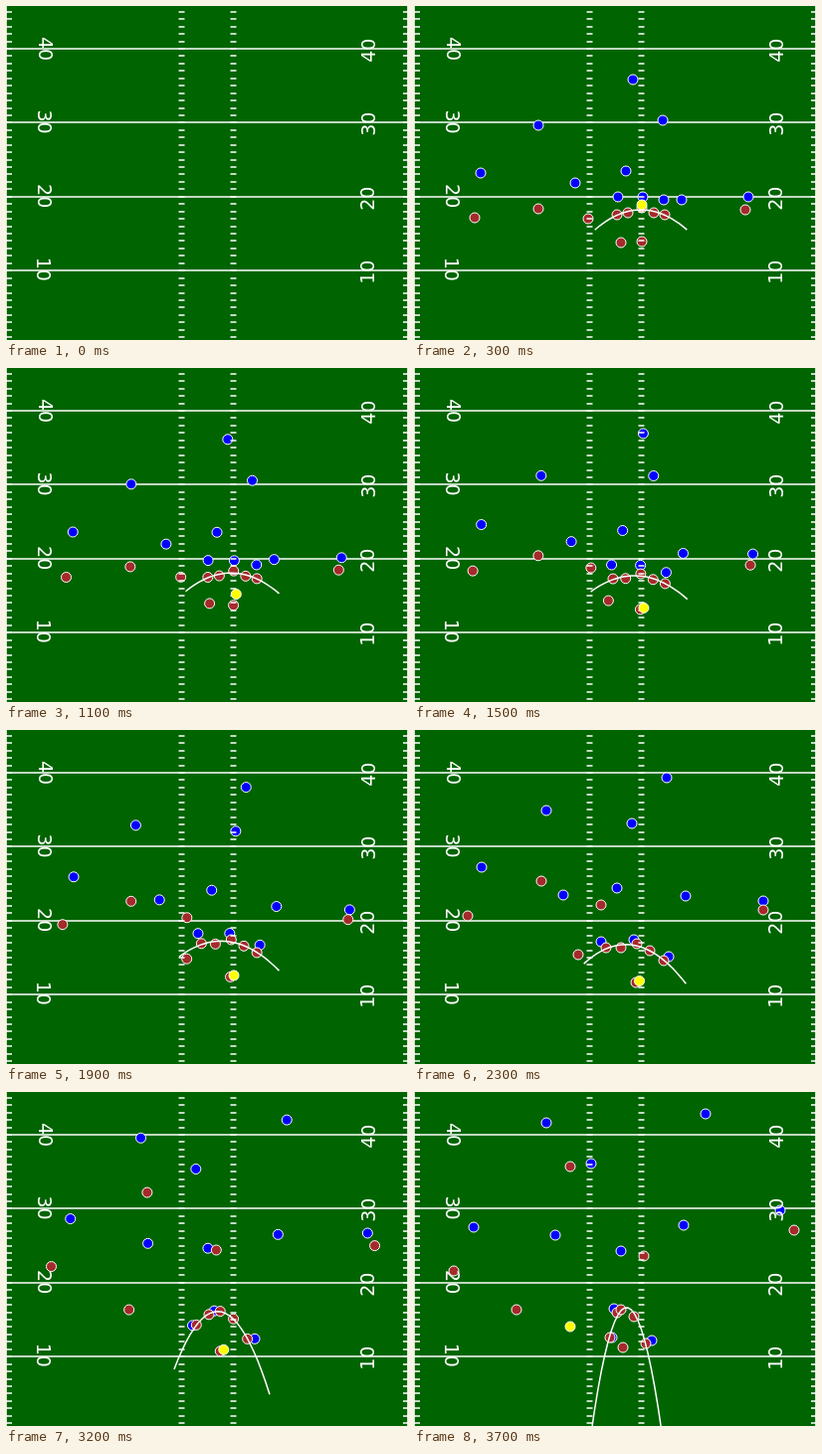
Write an HTML page with a canvas that moves like this. It is 404 px wide and 336 px high and loops after 3800 ms.

```html
<!DOCTYPE html>
<html lang="en">
<head>
<meta charset="utf-8">
<title>Football play</title>
<style>
html, body { margin: 0; width: 404px; height: 336px; overflow: hidden; background: #006400; }
canvas { display: block; }
</style>
</head>
<body>
<canvas id="field" width="404" height="336"></canvas>
<script>
const W = 404, H = 336, LOOP = 3800, STEP = 100;
const SNAP = 700, MID = 2300, THROW = 3300, END = 3700;
const YARD = 7.44, THICK = 1.5;
const g = document.getElementById('field').getContext('2d');

// Each route: x, y at the snap, at MID and at END
const defense = [
  [67, 168, 68, 138, 60, 136],
  [125, 120, 133, 81, 133, 31],
  [220, 74, 254, 48, 293, 22],
  [250, 115, 219, 94, 178, 72],
  [162, 178, 150, 166, 142, 144],
  [213, 166, 204, 159, 208, 160],
  [205, 192, 188, 213, 199, 247],
  [230, 192, 221, 211, 201, 218],
  [251, 195, 256, 228, 239, 250],
  [269, 195, 273, 167, 271, 134],
  [336, 192, 351, 172, 368, 119]
];
const line = [
  [204, 210, 193, 219, 197, 247],
  [215, 208, 208, 219, 204, 222],
  [229, 203, 224, 215, 208, 219],
  [241, 208, 237, 222, 221, 226],
  [252, 210, 251, 232, 233, 253]
];
const backs = [
  [61, 213, 54, 187, 40, 180],
  [125, 204, 128, 152, 157, 75],
  [175, 214, 188, 176, 231, 165],
  [333, 205, 351, 181, 382, 139],
  [208, 238, 165, 226, 103, 219]
];
const passer = [229, 237, 223, 254, 210, 257];

const progress = (t, from, to) => Math.min(1, Math.max(0, (t - from) / (to - from)));
const mix = (p, q, u) => p.map((v, k) => v + (q[k] - v) * u);
const yardLine = yards => Math.round(43 + yards * YARD);

// Cubic a u^2 + b u^3 from rest through the two later points
function place([x0, y0, x1, y1, x2, y2], t) {
  const u = progress(t, SNAP, END), m = progress(MID, SNAP, END);
  const run = (start, mid, end) => {
    const a = ((mid - start) / (m * m) - m * (end - start)) / (1 - m);
    return start + a * u * u + (end - start - a) * u ** 3;
  };
  return [run(x0, x1, x2), run(y0, y1, y2)];
}

function ballAt(t) {
  const [x, y] = place(passer, t);
  const u = progress(t, SNAP, 1300);
  const held = mix([229, 200], [x + 3.5, y - 1.5], u * u * (3 - 2 * u));
  return mix(held, [157, 236], progress(t, THROW, END));
}

function dot([x, y], fill) {
  g.beginPath();
  g.arc(x, y, 5, 0, 2 * Math.PI);
  g.fillStyle = fill;
  g.fill();
  g.lineWidth = 1;
  g.stroke();
}

// Least-squares parabola through the linemen, three yards wider on each side
function pocket(points) {
  const xs = points.map(p => p[0]), ys = points.map(p => p[1]);
  const sum = f => points.reduce((s, p, i) => s + f(xs[i] - cx, ys[i]), 0);
  const n = points.length, cx = xs.reduce((s, x) => s + x) / n;
  const s2 = sum(u => u * u), skew = sum(u => u ** 3) / s2;
  const q = u => u * u - skew * u - s2 / n;
  const mean = sum((u, y) => y) / n;
  const slope = sum((u, y) => u * y) / s2;
  const bend = sum((u, y) => q(u) * y) / sum(u => q(u) ** 2);
  const left = Math.min(...xs) - 3 * YARD, right = Math.max(...xs) + 3 * YARD;
  g.beginPath();
  for (let i = 0; i <= 24; i++) {
    const x = left + (right - left) * i / 24, u = x - cx;
    g.lineTo(x, mean + slope * u + bend * q(u));
  }
  g.lineWidth = THICK;
  g.stroke();
}

function turf() {
  g.fillStyle = '#006400';
  g.fillRect(0, 0, W, H);
  g.fillStyle = g.strokeStyle = '#fff';
  for (let i = 0; i < 40; i += 10) g.fillRect(0, yardLine(i) - THICK / 2, W, THICK);
}

function number(text, x, y, turn) {
  g.save();
  g.translate(x, y);
  g.rotate(turn * Math.PI / 2);
  g.fillText(text, 0, 0);
  g.restore();
}

function markings() {
  g.fillStyle = '#fff';
  g.fillRect(0, 0, 0.8, H);
  g.fillRect(W - 0.8, 0, 0.8, H);
  for (let i = -5; i < 40; i++) {
    for (const x of [0, 173.5, 225.5, 399]) g.fillRect(x, yardLine(i) - THICK / 2, 6, THICK);
  }
  g.font = '19px "DejaVu Sans", sans-serif';
  g.textAlign = 'center';
  for (let i = 0; i < 4; i++) {
    const text = 40 - 10 * i, y = yardLine(10 * i);
    number(text, 32.5 - Math.round(i * 0.6), y - i * 0.4, 1);
    number(text, 371 - Math.round(i * 0.4), y + 1.7, -1);
  }
}

function draw(now) {
  const t = Math.floor(now % LOOP / STEP) * STEP;
  turf();
  if (t === 0) return markings();
  const linemen = line.map(p => place(p, t));
  for (const p of defense) dot(place(p, t), '#00f');
  for (const p of [...backs, passer]) dot(place(p, t), '#a52a2a');
  for (const p of linemen) dot(p, '#a52a2a');
  markings();
  pocket(linemen);
  dot(ballAt(t), '#ff0');
}

let start;
function frame(now) {
  start ??= now;
  draw(now - start);
  requestAnimationFrame(frame);
}
draw(0);
requestAnimationFrame(frame);
</script>
</body>
</html>
```
